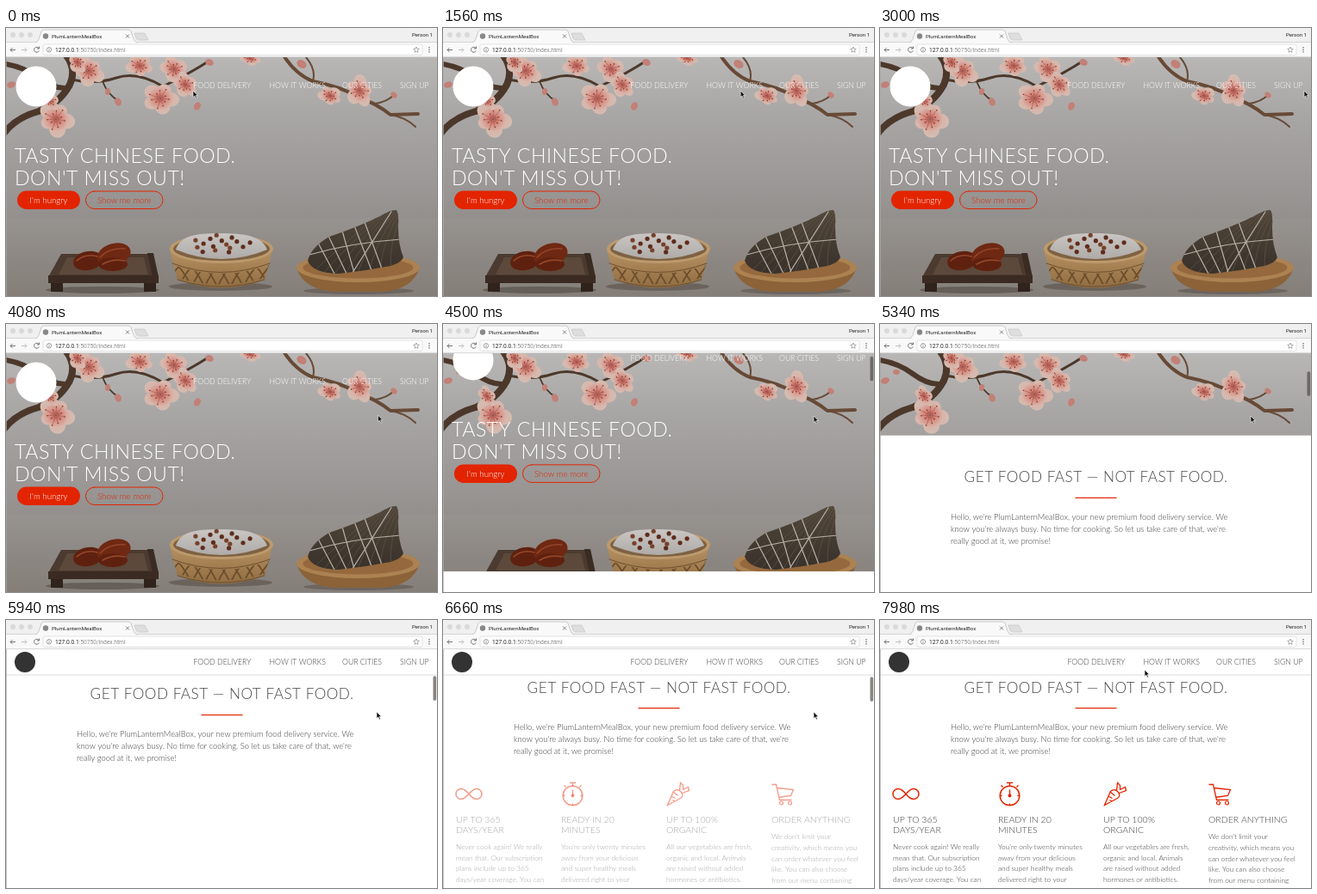
These frames come from a looping animation (500 by 312 pixels, 8 s). An HTML page with a canvas:

```html
<!DOCTYPE html>
<html lang="en">
<head>
<meta charset="utf-8">
<title>PlumLanternMealBox</title>
<style>
html, body { margin: 0; width: 100%; height: 100%; overflow: hidden; background: #fff; }
canvas { display: block; width: 500px; height: 312px; }
</style>
</head>
<body>
<canvas id="stage"></canvas>
<script>
const W = 500, H = 312, LOOP = 8000, TOP = 34, HERO_END = 314;
const BRAND = 'PlumLanternMealBox', RED = '#e32400', INK = '#3c3c3c', TAU = Math.PI * 2;
const canvas = document.getElementById('stage');
const c = canvas.getContext('2d');
const ratio = window.devicePixelRatio || 1;
canvas.width = W * ratio;
canvas.height = H * ratio;

// [time, value] keys
const SCROLL = [[4230, 0], [4500, 26], [5040, 119], [5340, 184], [5940, 276], [6400, 284]];
const CURSOR_X = [[0, 217], [2500, 455], [2900, 492], [3420, 492], [4150, 430], [7600, 430], [7980, 307]];
const CURSOR_Y = [[0, 73], [3420, 73], [4150, 107], [7600, 107], [7980, 58]];

const NAV = [['FOOD DELIVERY', 217.5], ['HOW IT WORKS', 305.5], ['OUR CITIES', 390], ['SIGN UP', 457]];
const INTRO = [
  `Hello, we're ${BRAND}, your new premium food delivery service. We`,
  "know you're always busy. No time for cooking. So let us take care of that, we're",
  "really good at it, we promise!"
];
const FEATURES = [
  { icon: infinity, title: ['UP TO 365', 'DAYS/YEAR'], text: ['Never cook again! We really', 'mean that. Our subscription',
    'plans include up to 365', 'days/year coverage. You can', 'also choose to order more'] },
  { icon: stopwatch, title: ['READY IN 20', 'MINUTES'], text: ["You're only twenty minutes", 'away from your delicious',
    'and super healthy meals', 'delivered right to your', 'home. We work with the'] },
  { icon: carrot, title: ['UP TO 100%', 'ORGANIC'], text: ['All our vegetables are fresh,', 'organic and local. Animals',
    'are raised without added', 'hormones or antibiotics.', 'Good for your health, the'] },
  { icon: cart, title: ['ORDER ANYTHING'], text: ["We don't limit your", 'creativity, which means you',
    'can order whatever you feel', 'like. You can also choose', 'from our menu containing', 'over 100 delicious meals'] }
];

const clamp = v => Math.max(0, Math.min(1, v));

// Monotone cubic interpolation, at rest at both ends
function track(keys, t) {
  const last = keys.length - 1;
  if (t <= keys[0][0]) return keys[0][1];
  if (t >= keys[last][0]) return keys[last][1];
  const i = keys.findIndex(k => k[0] > t) - 1;
  const slope = j => (keys[j + 1][1] - keys[j][1]) / (keys[j + 1][0] - keys[j][0]);
  const tangent = j => {
    if (j === 0 || j === last) return 0;
    const a = slope(j - 1), b = slope(j);
    return a * b > 0 ? 2 * a * b / (a + b) : 0;
  };
  const [t0, v0] = keys[i], [t1, v1] = keys[i + 1], d = t1 - t0, u = (t - t0) / d;
  return v0 + (v1 - v0) * u * u * (3 - 2 * u)
    + d * u * (1 - u) * (tangent(i) * (1 - u) - tangent(i + 1) * u);
}

function text(str, x, y, size, color, { family = 'Lato', weight = 300, letter = 0, align = 'left' } = {}) {
  c.font = `${weight} ${size}px ${family}, sans-serif`;
  c.letterSpacing = letter + 'px';
  c.textAlign = align;
  c.fillStyle = color;
  c.fillText(str, x, y);
}
const ui = (str, x, y, size, color) => text(str, x, y, size, color, { family: 'Roboto', weight: 400 });

function rect(x, y, w, h, color) {
  c.fillStyle = color;
  c.fillRect(x, y, w, h);
}
function path(d, fill, stroke, width = 1) {
  const p = new Path2D(d);
  if (fill) { c.fillStyle = fill; c.fill(p); }
  if (stroke) { c.strokeStyle = stroke; c.lineWidth = width; c.stroke(p); }
}
function oval(x, y, rx, ry, fill, rot = 0) {
  c.beginPath();
  c.ellipse(x, y, rx, ry, rot, 0, TAU);
  c.fillStyle = fill;
  c.fill();
}
const disc = (x, y, r, fill) => oval(x, y, r, r, fill);
function ring(x, y, r, color, width) {
  c.beginPath();
  c.arc(x, y, r, 0, TAU);
  c.strokeStyle = color;
  c.lineWidth = width;
  c.stroke();
}
function pill(x, y, w, h, fill, stroke) {
  c.beginPath();
  c.roundRect(x, y, w, h, h / 2);
  if (fill) { c.fillStyle = fill; c.fill(); }
  if (stroke) { c.strokeStyle = stroke; c.lineWidth = 1; c.stroke(); }
}
function gradient(y0, y1, ...stops) {
  const g = c.createLinearGradient(0, y0, 0, y1);
  stops.forEach(([at, color]) => g.addColorStop(at, color));
  return g;
}

function blossom(x, y, r, turn, squash = 1) {
  c.save();
  c.translate(x, y);
  c.rotate(turn);
  c.scale(1, squash);
  const g = c.createRadialGradient(0, 0, 0, 0, 0, r);
  g.addColorStop(0, '#b5524a');
  g.addColorStop(.3, '#d58a80');
  g.addColorStop(.65, '#d9b5aa');
  g.addColorStop(1, '#d2beb2');
  for (let i = 0; i < 5; i++) {
    c.rotate(TAU / 5);
    const size = r * (.9 + .1 * Math.sin(i * 3 + x));
    oval(size * .54, 0, size * .46, size * .42, g);
  }
  for (let i = 0; i < 11; i++) {
    c.rotate(TAU / 11);
    const len = r * (.3 + .14 * (i % 3));
    path(`M0 0H${len}`, null, '#a04a40', .5);
    disc(len, 0, .8, '#7c3d24');
  }
  c.restore();
}

function branches() {
  c.lineCap = c.lineJoin = 'round';
  const bark = '#4c382b';
  path('M-2 122Q12 104 38 97Q62 88 74 66Q82 48 70 32', null, bark, 8);
  path('M0 42Q22 46 38 58T68 70', null, bark, 6);
  path('M76 60Q104 66 128 58T182 68M182 68Q215 52 236 38', null, bark, 3);
  path('M112 62Q118 78 131 85', null, bark, 1.8);
  const twig = '#674a36';
  path('M322 32Q336 54 356 62Q388 68 408 80Q430 88 446 101L478 100', null, twig, 4);
  path('M356 62Q360 48 348 34M446 101Q464 104 475 115M428 88Q442 86 450 78', null, twig, 2);
  for (const [x, y, r] of [[6, 66, 5], [19, 56, 4], [130, 86, 5], [236, 40, 5], [222, 91, 5], [343, 42, 6],
    [450, 78, 4], [118, 74, 4]]) oval(x, y, r, r * .75, '#c28076', x);
  blossom(58, 106, 23, .2, .95);
  blossom(51, 84, 15, .9, .7);
  blossom(96, 50, 20, .5, .9);
  blossom(83, 40, 14, 1, .8);
  blossom(155, 44, 18, .3, .8);
  blossom(195, 48, 20, .7, .8);
  blossom(179, 82, 23, .1, .9);
  blossom(208, 66, 18, .8, .8);
  blossom(283, 35, 15, .3, .6);
  blossom(376, 79, 16, .5, .75);
  blossom(410, 73, 20, 1.1, .85);
}

function dateTray() {
  oval(112, 305, 66, 4, 'rgba(40,32,28,.35)');
  path('M64 263H167L176 290H49Z', '#4b3a2f');
  path('M71 267H160L165 287H61Z', '#5c493b');
  path('M49 288H177V297H49Z', '#3a2a22');
  path('M52 297H66V307H52ZM160 297H174V307H160Z', '#30231c');
  path('M164 262H171L177 290H170Z', '#3a2b23');
  oval(95, 271, 17, 11, '#5f210f', -.2);
  oval(125, 264, 20, 13, '#6f2812', -.3);
  oval(124, 275, 17, 8, '#5f210f');
  path('M82 271Q92 262 106 266M109 267Q120 255 138 257M112 275Q124 268 138 271', null, '#93462a', 1.6);
}

function riceBasket() {
  oval(249, 301, 60, 5, 'rgba(55,42,34,.35)');
  path('M190 258L199 293Q250 312 300 293L309 258Z', gradient(255, 304, [0, '#b99465'], [1, '#8f6b40']));
  c.save();
  c.clip(new Path2D('M194 276L199 291Q249 306 300 291L305 276Q249 296 194 276Z'));
  for (let x = 184; x < 320; x += 15) {
    path(`M${x} 306Q${x + 5} 290 ${x + 18} 276M${x + 18} 306Q${x + 12} 290 ${x} 276`, null, '#6c4d2b', 1.8);
  }
  c.restore();
  path('M193 274Q249 295 306 274M199 293Q249 309 300 293', null, '#6f5030', 1);
  oval(250, 257, 60, 17, '#bd9a6d');
  oval(250, 257, 56, 14, '#7f6243');
  path('M197 258C203 240 224 239 250 239C276 239 297 242 303 258Q250 280 197 258Z', gradient(239, 270, [0, '#c9c6c4'], [1, '#aeaaa7']));
  for (let i = 0; i < 16; i++) {
    const a = i * 2.4, d = Math.sqrt((i + .5) / 16);
    disc(249 + 38 * d * Math.cos(a), 252 + 11 * d * Math.sin(a), 2.6, i % 3 ? '#5f2c1c' : '#774028');
  }
}

function dumplingPlate() {
  oval(409, 306, 64, 4, 'rgba(55,42,34,.3)');
  path('M337 279Q345 305 382 307H438Q472 304 480 279Z', '#8c6238');
  oval(408.5, 279, 71.5, 17, '#ac8252');
  oval(408.5, 279, 64, 12.5, '#95693d');
  const leaf = new Path2D('M350 271Q354 255 375 243Q410 231 434 219Q447 211 453 212Q456 216 455 232Q455 252 461 267Q459 273 446 277Q416 283 386 286Q355 285 350 271Z');
  c.fillStyle = gradient(212, 288, [0, '#51463a'], [1, '#38312a']);
  c.fill(leaf);
  c.save();
  c.clip(leaf);
  for (let i = 0; i < 8; i++) path(`M${350 + i * 14} 290Q${385 + i * 8} 256 ${440 + i * 3} 212`, null, '#605547', .7);
  path('M362 250L382 288M374 242L396 288M390 236L404 285M404 230L424 282M416 226L436 280M352 264Q400 250 458 246M400 288L447 214', null, '#b9b1a6', 1.2);
  c.restore();
}

function hero(scroll) {
  c.save();
  c.beginPath();
  c.rect(0, TOP, W, HERO_END - scroll - TOP);
  c.clip();
  rect(0, TOP, W, H, gradient(TOP, H, [0, '#b9b7b6'], [.25, '#a8a6a5'], [.6, '#979492'], [1, '#807974']));
  rect(0, 222, W, 90, 'rgba(215,205,198,.05)');
  branches();
  dateTray();
  riceBasket();
  dumplingPlate();
  c.translate(0, -scroll);
  disc(35, 68, 23.5, '#fff');
  navLinks(69.5, '#fff');
  text('TASTY CHINESE FOOD.', 10, 157, 23.2, '#fff', { letter: .48 });
  text("DON'T MISS OUT!", 10, 183, 23.2, '#fff', { letter: .48 });
  pill(13, 189.5, 73, 21.5, RED);
  text("I'm hungry", 49.5, 203.8, 9.66, '#fff', { align: 'center' });
  pill(92.5, 190, 89.5, 20.5, null, RED);
  text('Show me more', 137.3, 203.8, 9.66, RED, { align: 'center' });
  c.restore();
}

function navLinks(y, color) {
  for (const [label, x] of NAV) text(label, x, y, 8.7, color);
}

function infinity() {
  path('M0 0C-4 -5 -7 -6 -9 -6A6 6 0 0 0 -9 6C-5 6 -3 3 0 0S5 -6 9 -6A6 6 0 0 1 9 6C7 6 4 5 0 0Z', null, RED, 1.5);
}
function stopwatch() {
  ring(0, 2, 11.3, RED, 1.5);
  path('M-3.5 -13H3.5M0 -13V-9M0 2V-5M8 -8L10 -10M-8 -8L-10 -10M0 11V13M-11 2H-9M9 2H11', null, RED, 1.4);
  disc(0, 2, 2, RED);
}
function carrot() {
  path('M-12 13L-5 -3Q0 -7 4 -2Q7 2 3 5ZM-7 3L-3 5M-5 -2L0 2M-4 9L-6 7M2 -4L3 -13L6 -10L6 -5L12 -8L13 -4L5 -1', null, RED, 1.3);
}
function cart() {
  path('M-13 -11H-8L-4 7H10M-7 -7L12 -5L9 2L-5 4', null, RED, 1.3);
  ring(-2, 10.5, 2, RED, 1.2);
  ring(8, 10.5, 2, RED, 1.2);
}

function features(opacity) {
  if (!opacity) return;
  c.save();
  c.globalAlpha = opacity;
  FEATURES.forEach(({ icon, title, text: lines }, i) => {
    const x = 15 + i * 122;
    c.save();
    c.translate(x + 13.5 + (i === 0 ? 1.5 : 0), 486.5);
    icon();
    c.restore();
    title.forEach((line, j) => text(line, x, 520 + j * 11.8, 10.5, INK));
    const first = 539.3 + (title.length - 1) * 11.8;
    lines.forEach((line, j) => text(line, x, first + j * 12.6, 8.35, INK));
  });
  c.restore();
}

function page(scroll, opacity) {
  c.save();
  c.translate(0, -scroll);
  text('GET FOOD FAST — NOT FAST FOOD.', 250.5, 368.5, 17.2, '#484848', { letter: .48, align: 'center' });
  rect(226.5, 386, 48, 1.2, RED);
  INTRO.forEach((line, i) => text(line, 82, 412 + i * 14, 9.4, INK));
  features(opacity);
  c.restore();
}

function stickyNav() {
  rect(0, TOP, W, 29.5, 'rgba(255,255,255,.98)');
  rect(0, 63.5, W, 1, '#dedede');
  disc(22, 49, 12, '#333');
  navLinks(52, INK);
}

function browserBar() {
  rect(0, 0, W, 17, '#f1f0f1');
  rect(0, 16.5, W, 17.5, '#f9f9f9');
  rect(0, 16.3, W, .7, '#c8c8c8');
  for (const x of [8, 18, 28]) disc(x, 8, 3, '#d9d9d9');
  path('M34 17Q37 16 38 13L41 4Q42 2 44 2H142Q144 2 145 4L148 13Q149 16 152 17', '#f9f9f9', '#b8b8b8', .7);
  path('M149 6H161L165 14H154Q152 14 151 12Z', '#dedede', '#c2c2c2', .6);
  disc(46, 9.5, 3.2, '#888');
  ui(BRAND, 53, 11.6, 6.1, '#222');
  path('M139 7.5L143 11.5M143 7.5L139 11.5', null, '#666', .8);
  ui('Person 1', 471, 10, 6.1, '#222');

  c.beginPath();
  c.roundRect(43, 19, 440, 12.5, 2);
  c.fillStyle = '#fff';
  c.fill();
  c.strokeStyle = '#d0d0d0';
  c.lineWidth = .6;
  c.stroke();
  path('M11 25.5H5M7.5 23L5 25.5L7.5 28', null, '#666', .9);
  path('M18 25.5H24M21.5 23L24 25.5L21.5 28', null, '#bbb', .9);
  path('M38 23.5A3 3 0 1 0 38.3 26.5M38.5 21.5V24H36', null, '#666', .9);
  ring(50, 25.3, 2.7, '#777', .7);
  rect(49.6, 24.8, .8, 2, '#777');
  rect(49.6, 23.4, .8, .8, '#777');
  ui('127.0.0.1', 57, 27.8, 6.65, '#222');
  const host = c.measureText('127.0.0.1').width;
  ui(':50750/index.html', 57 + host, 27.8, 6.65, '#888');
  path('M476 22L477 24.3L479.3 24.4L477.5 26L478.1 28.3L476 27L473.9 28.3L474.5 26L472.7 24.4L475 24.3Z', null, '#777', .6);
  for (const y of [22.8, 25.3, 27.8]) disc(491, y, .8, '#666');
  rect(0, 33.4, W, .7, '#c9c9c9');
}

function scrollbar(scroll, opacity) {
  c.save();
  c.globalAlpha = opacity;
  pill(495.5, 35 + scroll * .11, 3.7, 28.5, 'rgba(70,66,63,.65)');
  c.restore();
}

function cursor(x, y) {
  c.save();
  c.translate(x, y);
  path('M0 0V7.6L1.8 6L3.1 8.9L4.4 8.3L3.1 5.6H5.5Z', '#111', '#fff', .6);
  c.restore();
}

function draw(now) {
  const t = now % LOOP;
  const scroll = track(SCROLL, t);
  c.setTransform(ratio, 0, 0, ratio, 0, 0);
  rect(0, 0, W, H, '#fff');
  if (scroll < HERO_END - TOP) hero(scroll);
  page(scroll, clamp((t - 6200) / 1000));
  if (scroll > 251) stickyNav();
  rect(0, TOP, .7, H, '#aaa');
  browserBar();
  scrollbar(scroll, clamp((t - 4230) / 60) * clamp((7200 - t) / 250));
  cursor(track(CURSOR_X, t), track(CURSOR_Y, t));
  requestAnimationFrame(draw);
}
requestAnimationFrame(draw);
</script>
</body>
</html>
```
